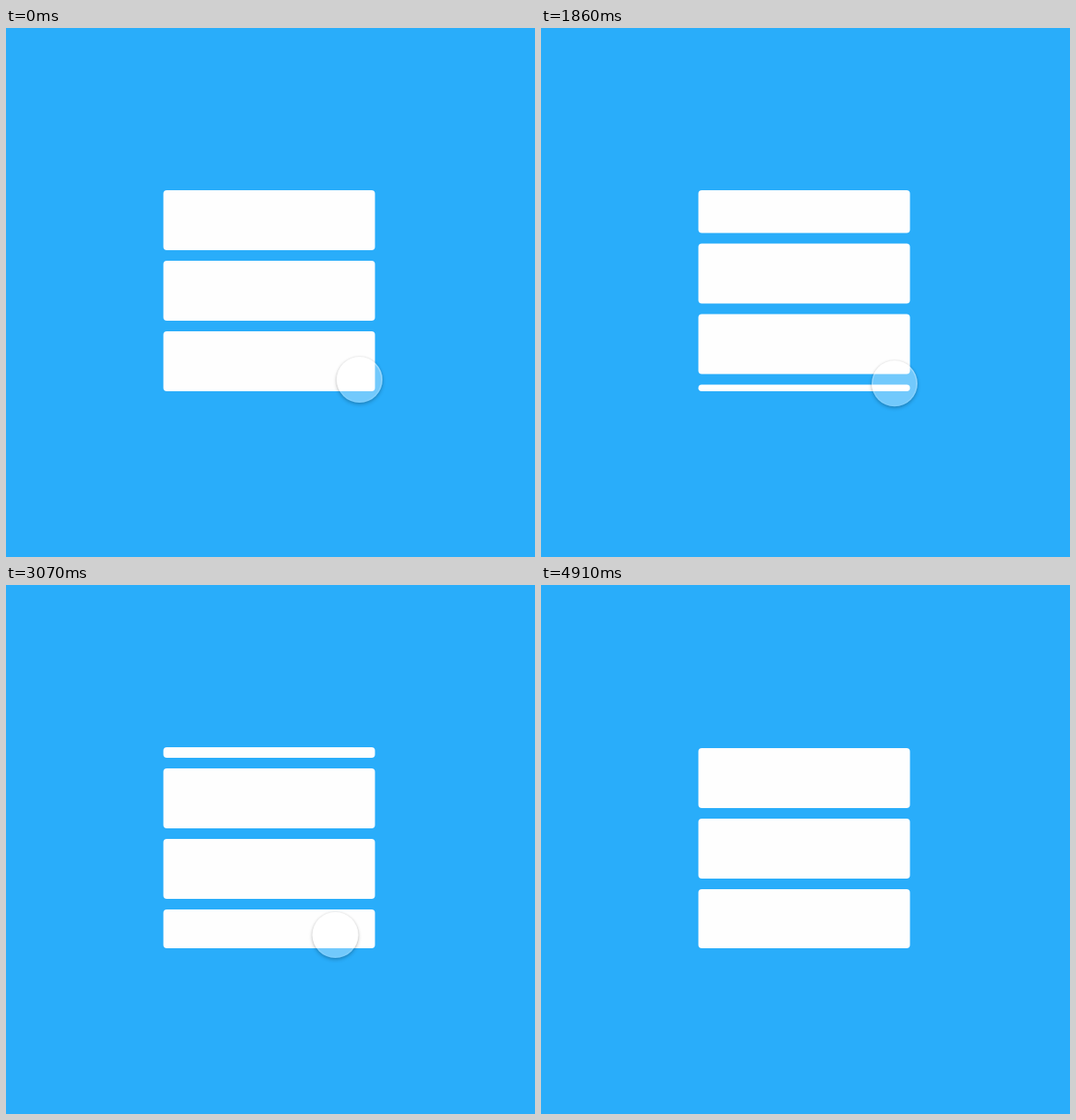
Write an HTML page with a canvas that moves like this. It is 600 px wide and 600 px high and loops after 5.74 s.

```html
<!DOCTYPE html>
<html lang="en">
<head>
<meta charset="utf-8">
<title>Scrolling list</title>
<style>
html, body { margin: 0; width: 100%; height: 100%; overflow: hidden; background: #29adfa; }
canvas { display: block; width: 600px; height: 600px; }
</style>
</head>
<body>
<canvas id="stage" width="600" height="600"></canvas>
<script>
const LOOP = 5740;
const list = { x: 178.5, y: 184, w: 240, h: 228, row: 68, pitch: 80, corner: 4 };
const touch = { radius: 26, swell: 7, pressTime: 140, releaseTime: 160 };
const ctx = document.getElementById('stage').getContext('2d');

// Each flick swells the touch point, then throws the list by a distance.
const flicks = [
  { press: 40, release: 700, start: 381, distance: 184, rate: 0.00378 },
  { press: 2010, release: 2460, start: 2238, distance: 200, rate: 0.00603 },
  { press: 3090, release: 3660, start: 3421, distance: 176, rate: 0.00487 }
];

// Turning points of the finger: [time, position].
const pathX = [[2400, 401], [3070, 373.5], [3980, 372]];
const pathY = [[420, 399], [760, 345.5], [1340, 357], [1900, 404], [2200, 404],
  [2590, 335], [3070, 397], [3300, 397], [3980, 271]];

// Smooth step from 0 to 1 between two times.
function ramp(t, from, to) {
  const u = Math.min(1, Math.max(0, (t - from) / (to - from)));
  return u * u * (3 - 2 * u);
}

function follow(path, t) {
  return path.slice(1).reduce((value, [time, target], i) => {
    const [prevTime, prev] = path[i];
    return value + (target - prev) * ramp(t, prevTime, time);
  }, path[0][1]);
}

// Critically damped approach from 0 to 1.
function glide(elapsed, rate) {
  const x = Math.max(0, elapsed) * rate;
  return 1 - (1 + x) * Math.exp(-x);
}

function sumFlicks(part) {
  return flicks.reduce((sum, flick) => sum + part(flick), 0);
}

const scrollAt = t => sumFlicks(f => f.distance * glide(t - f.start, f.rate));

const swellAt = t => sumFlicks(f =>
  ramp(t, f.press, f.press + touch.pressTime) - ramp(t, f.release, f.release + touch.releaseTime));

function drawRows(scroll) {
  const end = list.y + list.h;
  ctx.fillStyle = '#fefefe';
  for (let y = list.y - scroll % list.pitch; y < end; y += list.pitch) {
    const top = Math.max(y, list.y);
    const height = Math.min(y + list.row, end) - top;
    if (height <= 0) continue;
    ctx.beginPath();
    ctx.roundRect(list.x, top, list.w, height, list.corner);
    ctx.fill();
  }
}

function circle(x, y, r) {
  ctx.beginPath();
  ctx.arc(x, y, r, 0, Math.PI * 2);
}

// Casts only the shadow: the shape itself lies off the stage.
function castShadow(x, y, r, drop, blur, color) {
  ctx.shadowColor = color;
  ctx.shadowBlur = blur;
  ctx.shadowOffsetX = 2000;
  ctx.shadowOffsetY = drop;
  circle(x - 2000, y, r);
  ctx.fill();
}

function drawTouch(x, y, r, alpha) {
  if (alpha <= 0) return;
  ctx.save();
  ctx.globalAlpha = alpha;

  ctx.save();
  circle(x, y, r);
  ctx.rect(0, 0, 600, 600);
  ctx.clip('evenodd');
  ctx.fillStyle = '#000';
  castShadow(x, y, r, 2, 4, 'rgba(0,0,0,.22)');
  castShadow(x, y, r, 0, 3, 'rgba(0,0,0,.1)');
  ctx.restore();

  circle(x, y, r);
  ctx.fillStyle = 'rgba(255,255,255,.34)';
  ctx.fill();

  const rim = ctx.createLinearGradient(0, y - r, 0, y + r);
  rim.addColorStop(0, 'rgba(255,255,255,.4)');
  rim.addColorStop(1, 'rgba(255,255,255,.05)');
  circle(x, y, r - 0.75);
  ctx.strokeStyle = rim;
  ctx.lineWidth = 1.5;
  ctx.stroke();
  ctx.restore();
}

function draw(t) {
  ctx.fillStyle = '#29adfa';
  ctx.fillRect(0, 0, 600, 600);
  drawRows(scrollAt(t));
  const radius = touch.radius + touch.swell * swellAt(t);
  drawTouch(follow(pathX, t), follow(pathY, t), radius, 1 - ramp(t, 3700, 4030));
}

const begin = performance.now();
function tick() {
  draw((performance.now() - begin) % LOOP);
  requestAnimationFrame(tick);
}
tick();
</script>
</body>
</html>
```
